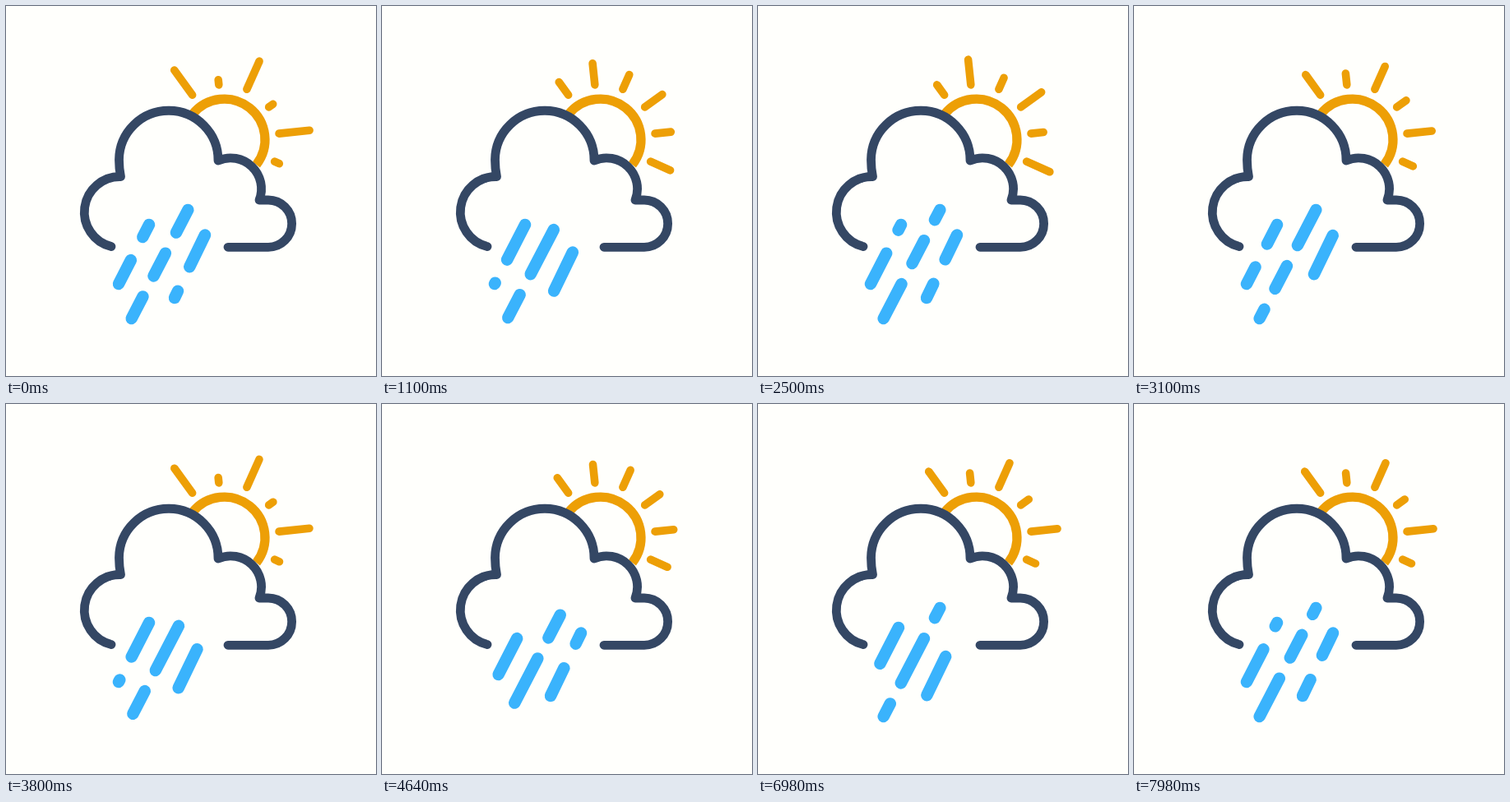
Write an HTML page that moves like this. It is 450 px wide and 450 px high and loops after 8 s.

```html
<!DOCTYPE html>
<html lang="en">
<head>
<meta charset="utf-8">
<title>Sun, cloud and rain</title>
<style>
  html, body { margin: 0; width: 100%; height: 100%; overflow: hidden; background: #fffffc; }
  svg { display: block; width: 100%; height: 100%; }
  svg * { fill: none; stroke-linecap: round; stroke-linejoin: round; }
  .sun { stroke: #ed9f06; stroke-width: 11.2; }
  .sun path { stroke-linecap: butt; }
  #rays { stroke-width: 9.6; }
  .cloud { stroke: #344764; stroke-width: 10.8; }
  #rain { stroke: #3ab3fc; stroke-width: 14.5; }
</style>
</head>
<body>
<svg viewBox="0 0 450 450">
  <g class="sun">
    <path d="M227 131.5A49.47 49.47 0 0 1 304.5 193"/>
    <g id="rays"></g>
  </g>
  <path class="cloud" d="M128 292.5A43.15 43.15 0 0 1 139.5 207.5C138 200 137.5 193 137.5 187
    A60.25 60.25 0 0 1 258 188A37.5 37.5 0 0 1 308 236H319A28.6 28.6 0 0 1 319 293.3H270"/>
  <g id="rain"></g>
</svg>
<script>
const LOOP = 8000, RAY_PERIOD = 80, RAIN_PERIOD = 60;
const SUN = { x: 265.8, y: 162.1, rayStart: 66.6 };

function addLine(parentId, attrs) {
  const line = document.createElementNS("http://www.w3.org/2000/svg", "line");
  for (const name in attrs) line.setAttribute(name, attrs[name]);
  return document.getElementById(parentId).appendChild(line);
}

// Each ray lies along the x axis and is rotated around the sun.
const rays = Array.from({ length: 6 }, (_, i) => addLine("rays", {
  x1: SUN.rayStart,
  transform: `translate(${SUN.x} ${SUN.y}) rotate(${-126 + 30 * i})`
}));

// Dash lengths are fractions of the lane; the pattern repeats once per lane.
const lanes = [
  { from: [174, 266], to: [137, 338], dashes: [.61, .39], shift: 0 },
  { from: [221.3, 248], to: [152.7, 380], dashes: [.41, .19, .21, .19], shift: 0 },
  { from: [242, 278.5], to: [205, 355], dashes: [.615, .385], shift: .297 }
].map(lane => {
  const [x1, y1] = lane.from, [x2, y2] = lane.to;
  const length = Math.hypot(x2 - x1, y2 - y1);
  const line = addLine("rain", {
    x1, y1, x2, y2, "stroke-dasharray": lane.dashes.map(d => d * length).join(" ")
  });
  return { ...lane, line, length };
});

// Steps come in threes, held for 20, 20 and 100 ms.
function stepAt(time) {
  const t = time % LOOP + 20, rest = t % 140;
  return Math.floor(t / 140) * 3 + Math.min(2, Math.floor(rest / 20)) - 1;
}

function draw(time) {
  const step = stepAt(time);
  const swing = Math.cos(2 * Math.PI * step / RAY_PERIOD);
  rays.forEach((ray, i) => {
    const length = i % 2 ? 22.4 - 16.2 * swing : 22.8 + 14.5 * swing;
    ray.setAttribute("x2", SUN.rayStart + length);
  });
  for (const { line, length, dashes, shift } of lanes) {
    const head = (.209 + shift + step / RAIN_PERIOD) % 1;
    line.setAttribute("stroke-dashoffset", (dashes[0] - head + 1) * length);
  }
}

function tick() {
  draw(performance.now());
  requestAnimationFrame(tick);
}
tick();
</script>
</body>
</html>
```
